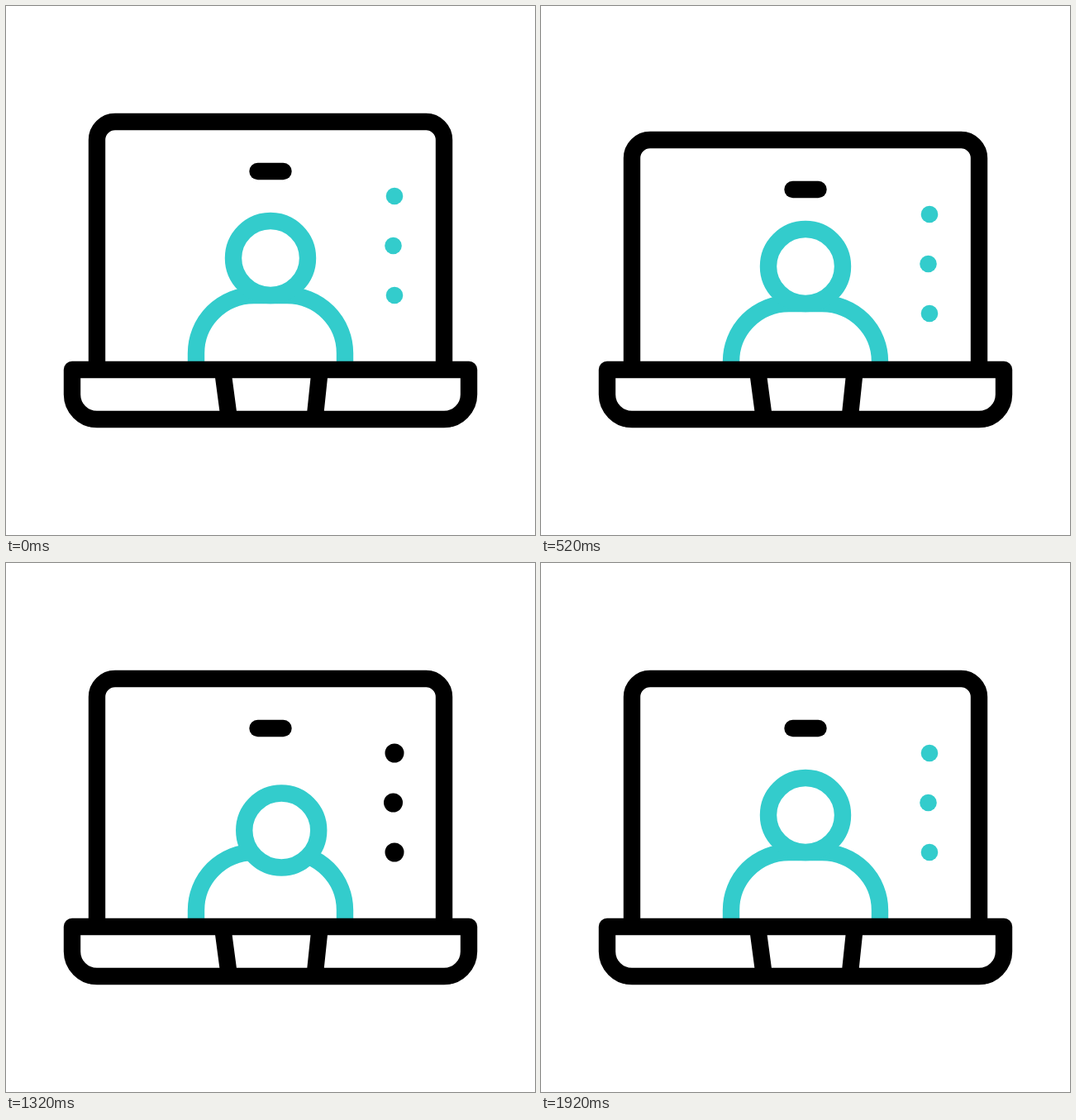
An HTML page that plays this animation: 640x640 px, repeating every 2000 ms.

```html
<!DOCTYPE html>
<html lang="en">
<head>
<meta charset="utf-8">
<title>Video call on a laptop</title>
<style>
  html, body { margin: 0; width: 100%; height: 100%; overflow: hidden; background: #fff; }
  svg { display: block; width: 100%; height: 100%; }
  .line { fill: none; stroke: #000; stroke-width: 20.4; stroke-linejoin: round; }
  .teal { stroke: #33cccc; }
</style>
</head>
<body>
<svg viewBox="0 0 640 640">
  <path id="body" class="line teal"/>
  <circle id="head" class="line teal" r="45" style="fill:#fff"/>
  <path id="lid" class="line"/>
  <path id="camera" class="line" stroke-linecap="round" d="M304.5 200H335.5"/>
  <g id="dots"></g>
  <path id="base" class="line"/>
</svg>
<script>
const $ = id => document.getElementById(id);
const STEP = 40, STEPS = 50;

// Eased value at step s, from a flat list of step, value pairs.
function track(s, keys) {
  if (s <= keys[0]) return keys[1];
  for (let i = 2; i < keys.length; i += 2) {
    if (s < keys[i]) {
      const p = (s - keys[i - 2]) / (keys[i] - keys[i - 2]);
      return keys[i - 1] + (keys[i + 1] - keys[i - 1]) * p * p * (3 - 2 * p);
    }
  }
  return keys[keys.length - 1];
}

// Vertical offset of a jump: rise, landing dip, settle.
const jump = (s, rise, dip) => track(s, [2, 0, 8, -rise, 13, dip, 19, 0]);

// Bottom dot first; each has a black disc that fades in and out over it.
const dots = [[470, 350], [468.5, 290], [470, 230]].map(([x, y]) => {
  const add = (r, fill) => {
    const c = document.createElementNS("http://www.w3.org/2000/svg", "circle");
    const attrs = { cx: x, cy: y, r, fill };
    for (const k in attrs) c.setAttribute(k, attrs[k]);
    $("dots").append(c);
    return c;
  };
  add(10.3, "#33cccc");
  return add(11.5, "#000");
});

function draw(s) {
  const top = 440 + jump(s, 53, 0);
  const bottom = 500 + jump(s, 41, 0);
  const dx = -jump(s, 0.8, 0);
  const lid = 140 + jump(s, 24, 22);
  const lift = jump(s, 65.5, 10);
  const side = 420 + jump(s, 53, 10);
  const chest = 350 + lift;
  const ry = side - chest;

  $("base").setAttribute("d",
    `M${80 + dx} ${top}h480V${bottom - 30}a30 30 0 0 1-30 30h-420a30 30 0 0 1-30-30Z` +
    `M${262 + dx} ${top}L${270 + dx} ${bottom}M${379.8 + dx} ${top}L${373.5 + dx} ${bottom}`);
  $("lid").setAttribute("d",
    `M${110 + dx} ${top}L110 ${lid + 22}a22 22 0 0 1 22-22H508a22 22 0 0 1 22 22L${530 + dx} ${top}`);
  $("body").setAttribute("d",
    `M230 ${top}V${side}A70 ${ry} 0 0 1 300 ${chest}H340A70 ${ry} 0 0 1 410 ${side}V${top}`);
  $("camera").setAttribute("transform", `translate(0 ${jump(s, 50, 22)})`);
  $("dots").setAttribute("transform", `translate(0 ${jump(s, 46, 22)})`);

  // The head tilts right, then left, then returns.
  const tilt = track(s, [21, 0, 29, 15, 32, 15, 39.5, -21.3, 41.2, -21.3, 48, 0]);
  const sink = track(s, [21, 0, 29, 18.5, 41.2, 18.5, 48, 0]);
  $("head").setAttribute("cx", 320 + tilt);
  $("head").setAttribute("cy", 305 + lift + sink);

  dots.forEach((dot, i) => {
    const d = 2 * i;
    dot.setAttribute("opacity", track(s, [21 + d, 0, 24 + d, 1, 33.5 + d, 1, 38.5 + d, 0]));
  });
}

const start = performance.now();
function tick() {
  draw(Math.floor((performance.now() - start) / STEP) % STEPS);
  requestAnimationFrame(tick);
}
tick();
</script>
</body>
</html>
```
